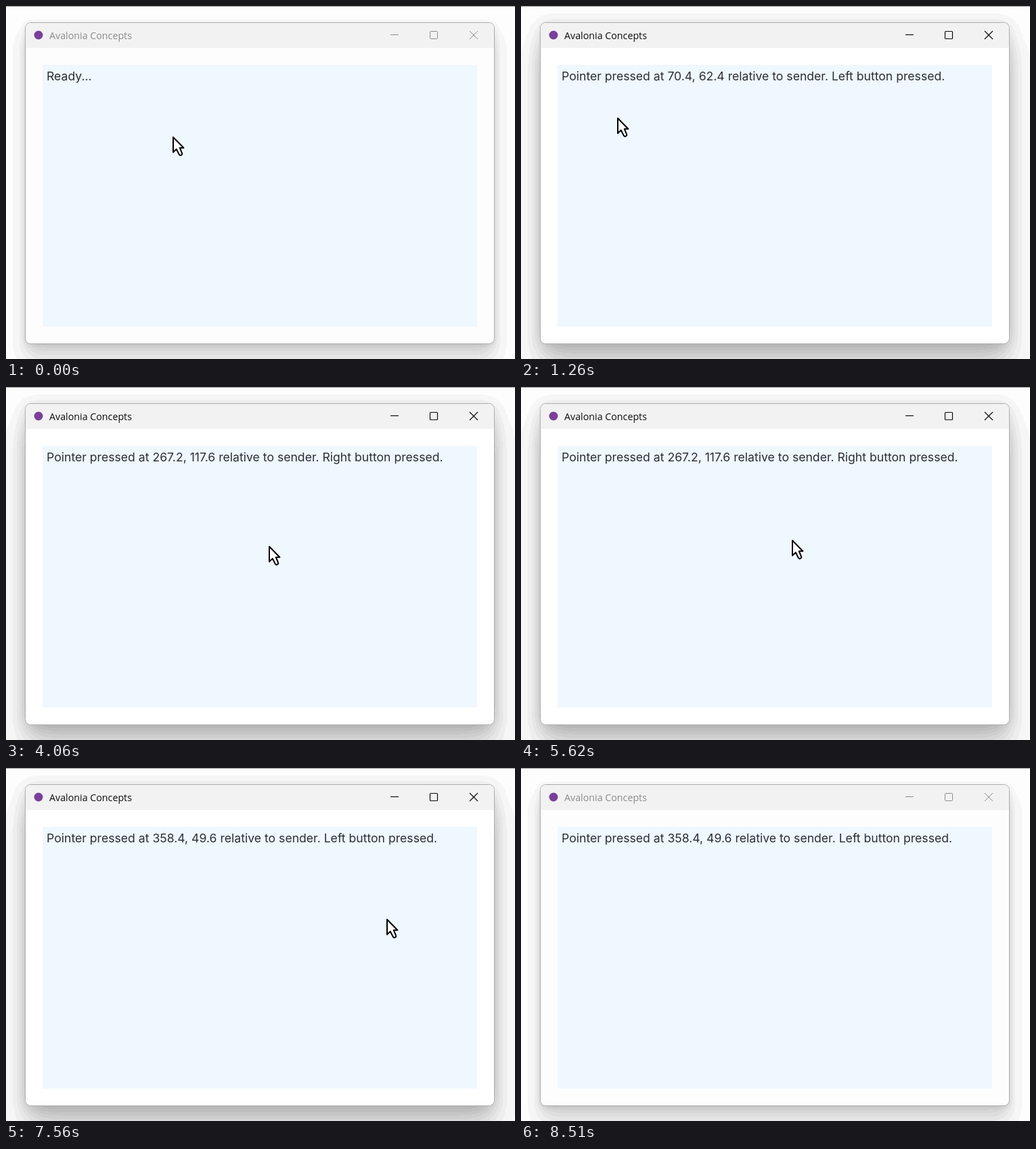
These frames come from a looping animation (752 by 522 pixels, 8530 ms). An HTML page:

```html
<!DOCTYPE html>
<html lang="en">
<head>
<meta charset="utf-8">
<title>Pointer demo</title>
<style>
  html, body { margin: 0; width: 100%; height: 100%; overflow: hidden; background: #fdfdfd; }
  svg { display: block; }
  #title { font: 14.25px "Open Sans", sans-serif; }
  #message { font: 17.62px Inter, sans-serif; fill: #2a2e34; }
  #window { --ink: #8b8b8b; --page: #fdfdfd; --line: 1; }
  #window.active { --ink: #0c0c0c; --page: #fff; --line: 1.2; }
  #title { fill: var(--ink); }
  #buttons { fill: none; stroke: var(--ink); stroke-width: var(--line); }
  #frame { fill: var(--page); stroke: #acacac; }
</style>
</head>
<body>
<svg width="752" height="522" viewBox="0 0 752 522">
  <defs id="defs"></defs>
  <rect width="752" height="1" fill="#999"/>
  <g id="window">
    <rect id="shadow" x="28" y="24" width="694" height="476" rx="8"/>
    <rect id="frame" x="28.5" y="24.5" width="693" height="475" rx="8"/>
    <path d="M29 62V33a8 8 0 0 1 8-8H713a8 8 0 0 1 8 8V62z" fill="#f2f2f2"/>
    <circle cx="48" cy="43" r="6.5" fill="#7a4098"/>
    <text id="title" x="64" y="49">Avalonia Concepts</text>
    <g id="buttons">
      <path d="M568 42.5h12"/>
      <rect x="626.5" y="37.5" width="11" height="11" rx="1"/>
      <path d="M685 37l12 12m0-12l-12 12"/>
    </g>
    <rect x="54" y="87" width="642" height="387" fill="#eff7ff"/>
    <text id="message" x="60" y="110"></text>
  </g>
  <path id="cursor" d="M1 1V23.3L5.8 18.6L9.8 26.6Q10.8 28.4 12.6 27.6Q14.9 26.6 14.1 24.8L10.8 16.8H16.4z"
        fill="#fff" stroke="#000" stroke-width="2" stroke-linejoin="round"/>
</svg>
<script>
const LOOP = 8530, ACTIVE_FROM = 1260, ACTIVE_TO = 8510;
const STEP = 135; // the pointer is sampled at this interval while it glides
const get = id => document.getElementById(id);

// Two stacked soft shadows, reduced to visible grey steps.
const levels = Array.from({ length: 32 }, (_, i) => i / 32).join(" ");
const dropLayer = (name, dy, blur, alpha) => `
  <feGaussianBlur in="SourceAlpha" stdDeviation="${blur}"/>
  <feOffset dy="${dy}"/>
  <feComponentTransfer result="${name}"><feFuncA type="linear" slope="${alpha}"/></feComponentTransfer>`;
const shadowFilter = (id, far, near) => `
  <filter id="${id}" filterUnits="userSpaceOnUse" x="-100" y="-100" width="952" height="760">
    ${dropLayer("far", ...far)}${dropLayer("near", ...near)}
    <feComposite in="far" in2="near" operator="arithmetic" k2="1" k3="1"/>
    <feComponentTransfer><feFuncA type="linear" slope="1" intercept=".023"/></feComponentTransfer>
    <feComponentTransfer><feFuncA type="discrete" tableValues="${levels}"/></feComponentTransfer>
  </filter>`;
get("defs").innerHTML =
  shadowFilter("raised", [32, 20, .22], [2, 11, .15]) +
  shadowFilter("resting", [20, 13, .17], [2, 5, .1]);

const home = { x: 246, y: 193 };
const glides = [
  { start: 410, steps: 4, x: 142, y: 165 },
  { start: 2400, steps: 5, x: 371, y: 221 },
  { start: 3070, steps: 2, x: 388, y: 235 },
  { start: 5620, steps: 5, x: 502, y: 149 },
  { start: 7560, steps: 1, x: 562, y: 223 },
  { start: 7710, steps: 2, x: 676, y: 488 }
];
const ease = p => p * p * (3 - 2 * p);
const mix = (a, b, p) => Math.round(a + (b - a) * p);
const pointerAt = t => glides.reduce((from, { start, steps, x, y }) => {
  const taken = Math.floor((t - start) / STEP) + 1;
  const p = ease(Math.min(1, Math.max(0, taken / steps)));
  return { x: mix(from.x, x, p), y: mix(from.y, y, p) };
}, home);

const pressed = (x, y, side) => `Pointer pressed at ${x}, ${y} relative to sender. ${side} button pressed.`;
const messageAt = t =>
  t < ACTIVE_FROM ? "Ready..." :
  t < 3500 ? pressed(70.4, 62.4, "Left") :
  t < 6440 ? pressed(267.2, 117.6, "Right") :
  pressed(358.4, 49.6, "Left");

function draw() {
  const t = performance.now() % LOOP;
  const active = t >= ACTIVE_FROM && t < ACTIVE_TO;
  const { x, y } = pointerAt(t);
  get("cursor").setAttribute("transform", `translate(${x} ${y})`);
  get("cursor").setAttribute("visibility", t < ACTIVE_TO ? "visible" : "hidden");
  get("message").textContent = messageAt(t);
  get("window").classList.toggle("active", active);
  get("shadow").setAttribute("filter", `url(#${active ? "raised" : "resting"})`);
  requestAnimationFrame(draw);
}
draw();
</script>
</body>
</html>
```
